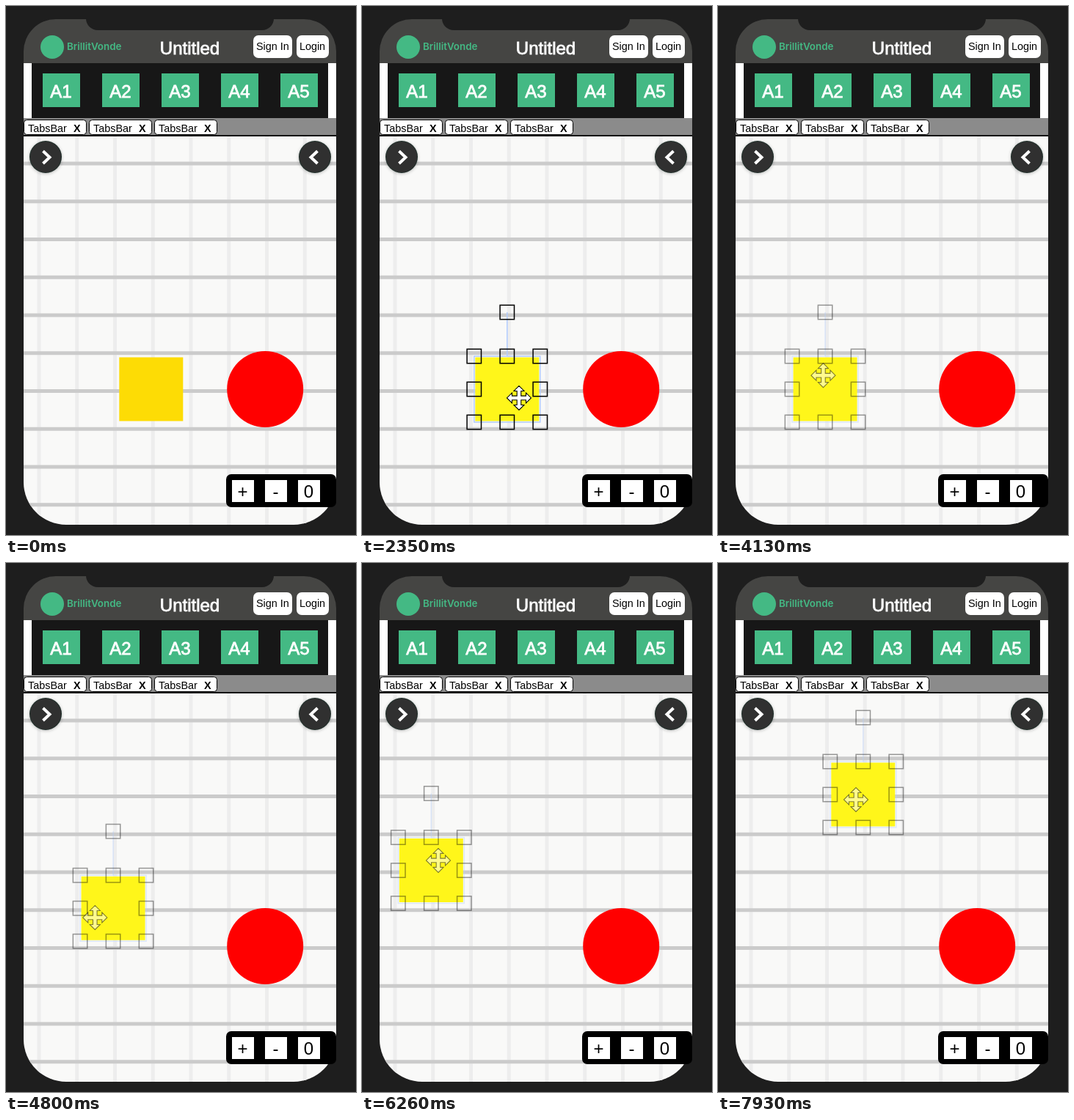
Write an HTML page with a canvas that moves like this. It is 477 by 722 pixels and loops after 8000 ms.

```html
<!DOCTYPE html>
<html lang="en">
<head>
<meta charset="utf-8">
<title>Grid snapping</title>
<style>
html, body { margin: 0; width: 100%; height: 100%; overflow: hidden; background: #1e1e1e; }
canvas { display: block; width: 477px; height: 722px; }
</style>
</head>
<body>
<canvas id="stage" width="477" height="722"></canvas>
<script>
const ctx = document.getElementById('stage').getContext('2d');
const LOOP = 8000, CELL = 51.75, SIDE = 87;
const ENTER = 370, SELECT = 1300, DRAG = 3020;
const HOME = { x: 197.8, y: 523 };
const GRAB = 7; // the pointer holds the square this far above its centre
const SANS = '"Liberation Sans", Arial, sans-serif';
const GREEN = '#44b984', DARK = '#1e1e1e';

// pointer moves: start, end, and the point reached; it rests in between
const entry = { x: 401, y: 716 };
const moves = [
  [370, 1170, 221, 537],
  [1190, 1570, 214, 535],
  [2350, 2770, 203, 516],
  [3020, 3310, 149, 525],
  [3760, 4560, 137, 480],
  [4580, 5030, 105, 488],
  [5290, 5390, 103, 468],
  [5780, 5940, 104, 425],
  [6130, 6480, 104, 374],
  [6700, 6850, 104, 328],
  [7090, 7240, 147, 325],
  [7240, 7930, 188, 323]
];

function pointerAt(t) {
  let { x, y } = entry;
  for (const [from, to, tx, ty] of moves) {
    const p = Math.min(1, Math.max(0, (t - from) / (to - from)));
    x += (tx - x) * p;
    y += (ty - y) * p;
  }
  return { x, y };
}

const snap = (v, base) => base + CELL * Math.round((v - base) / CELL);

function rect(x, y, w, h, fill) {
  ctx.fillStyle = fill;
  ctx.fillRect(x, y, w, h);
}

function round(x, y, w, h, r, fill, stroke) {
  ctx.beginPath();
  ctx.roundRect(x, y, w, h, r);
  ctx.fillStyle = fill;
  ctx.fill();
  if (stroke) {
    ctx.strokeStyle = stroke;
    ctx.lineWidth = 1;
    ctx.stroke();
  }
}

function disc(x, y, r, fill) {
  ctx.beginPath();
  ctx.arc(x, y, r, 0, Math.PI * 2);
  ctx.fillStyle = fill;
  ctx.fill();
}

function text(s, x, y, font, fill, align = 'left') {
  ctx.font = font;
  ctx.fillStyle = fill;
  ctx.textAlign = align;
  ctx.fillText(s, x, y);
}

function heavyText(s, x, y) {
  text(s, x, y, '24px ' + SANS, '#fff', 'center');
  ctx.strokeStyle = '#fff';
  ctx.lineWidth = 0.8;
  ctx.strokeText(s, x, y);
}

function drawGrid() {
  rect(24, 178, 426, 530, '#f9f9f8');
  for (let x = 42.5; x < 450; x += CELL) rect(x, 178, 5, 530, '#ededed');
  for (let y = 212.5; y < 700; y += CELL) rect(24, y, 426, 5, '#cbcbcb');
}

function drawHandles(x, y, alpha) {
  const d = 45, stem = 105;
  const box = (dx, dy) => ctx.strokeRect(x + dx - 9.7, y + dy - 9.7, 19.4, 19.4);
  ctx.save();
  ctx.globalAlpha = alpha;
  ctx.strokeStyle = '#b2ccff';
  ctx.lineWidth = 1.5;
  ctx.strokeRect(x - d, y - d, d * 2, d * 2);
  ctx.beginPath();
  ctx.moveTo(x, y - d);
  ctx.lineTo(x, y - stem);
  ctx.stroke();
  ctx.strokeStyle = '#000';
  for (const dx of [-d, 0, d])
    for (const dy of [-d, 0, d])
      if (dx || dy) box(dx, dy);
  box(0, -stem);
  ctx.restore();
}

function drawHeader() {
  rect(24, 18, 426, 60, '#454543');
  disc(63, 56, 16, GREEN);
  text('BrillitVonde', 83, 60, '600 13.4px Inter, sans-serif', GREEN);
  heavyText('Untitled', 250.5, 66);
  round(337, 40, 53, 31, 7, '#fff');
  round(396, 40, 44, 31, 7, '#fff');
  text('Sign In', 363.3, 60, '14.4px ' + SANS, '#000', 'center');
  text('Login', 417.5, 60, '14.4px ' + SANS, '#000', 'center');

  rect(24, 78, 426, 75, '#fff');
  rect(35, 78, 404, 75, '#171717');
  for (let i = 0; i < 5; i++) {
    rect(50 + i * 81, 92, 51, 46, GREEN);
    heavyText('A' + (i + 1), 75 + i * 81, 124.5);
  }

  rect(24, 153, 426, 24, '#8b8b8b');
  rect(24, 176, 426, 2, '#111');
  for (let i = 0; i < 3; i++) {
    const x = 24.5 + i * 89;
    round(x, 155.5, 85, 20, 4, '#fff', '#000');
    text('TabsBar', x + 5.5, 172, '14.4px ' + SANS, '#000');
    text('X', x + 67.5, 172, 'bold 14.4px ' + SANS, '#000');
  }
}

function drawArrowButton(x, dir) {
  ctx.save();
  ctx.shadowColor = 'rgba(0,0,0,.25)';
  ctx.shadowBlur = 4;
  ctx.shadowOffsetY = 1;
  disc(x, 206, 22, '#20302b');
  ctx.restore();
  disc(x, 206, 21, '#303030');
  ctx.strokeStyle = '#fff';
  ctx.lineWidth = 4;
  ctx.beginPath();
  ctx.moveTo(x - 3.5 * dir, 198);
  ctx.lineTo(x + 5.5 * dir, 206.5);
  ctx.lineTo(x - 3.5 * dir, 215);
  ctx.stroke();
}

function drawZoomBar() {
  round(300, 639, 150, 45, 7, '#000');
  ['+', '-', '0'].forEach((s, i) => {
    rect(308 + i * 45, 647, 30, 30, '#fff');
    text(s, 322.5 + i * 45, 671, '24px ' + SANS, '#000', 'center');
  });
}

function tracePointer(move) {
  ctx.beginPath();
  if (!move) {
    ctx.lineTo(0, 0);
    ctx.lineTo(0, 16);
    ctx.lineTo(4, 12);
    ctx.lineTo(11, 11);
  }
  // one arm, turned a quarter four times
  const reach = 16.5, head = 7, shaft = 2.8, neck = reach - head;
  for (let k = 0; move && k < 4; k++) {
    ctx.lineTo(shaft, -shaft);
    ctx.lineTo(shaft, -neck);
    ctx.lineTo(head, -neck);
    ctx.lineTo(0, -reach);
    ctx.lineTo(-head, -neck);
    ctx.lineTo(-shaft, -neck);
    ctx.rotate(-Math.PI / 2);
  }
  ctx.closePath();
}

function drawPointer({ x, y }, move, alpha) {
  ctx.save();
  ctx.translate(x, y);
  ctx.globalAlpha = alpha;
  tracePointer(move);
  ctx.fillStyle = '#fff';
  ctx.fill();
  ctx.strokeStyle = '#000';
  ctx.lineWidth = 1.1;
  ctx.stroke();
  ctx.restore();
}

function draw(t) {
  const picked = t >= SELECT, drag = t >= DRAG;
  const p = pointerAt(t);
  const x = drag ? snap(p.x, HOME.x) : HOME.x;
  const y = drag ? snap(p.y + GRAB, HOME.y) : HOME.y;

  rect(0, 0, 477, 722, DARK);
  ctx.save();
  ctx.beginPath();
  ctx.roundRect(24, 18, 426, 690, [44, 44, 58, 58]);
  ctx.clip();
  drawGrid();
  rect(x - SIDE / 2, y - SIDE / 2, SIDE, SIDE, picked ? '#fff61a' : '#fddc05');
  disc(353.2, 523, 52, '#f00');
  if (picked) drawHandles(x, y, drag ? 0.4 : 1);
  drawHeader();
  drawArrowButton(54, 1);
  drawArrowButton(421, -1);
  ctx.restore();
  drawZoomBar();
  round(109, 10, 256, 23, [0, 0, 16, 16], DARK);

  if (t >= ENTER) {
    const over = Math.max(Math.abs(p.x - x), Math.abs(p.y - y)) < SIDE / 2;
    drawPointer(p, over || drag, drag ? 0.5 : 1);
  }
}

const start = performance.now();
function tick() {
  draw((performance.now() - start) % LOOP);
  requestAnimationFrame(tick);
}
tick();
</script>
</body>
</html>
```
